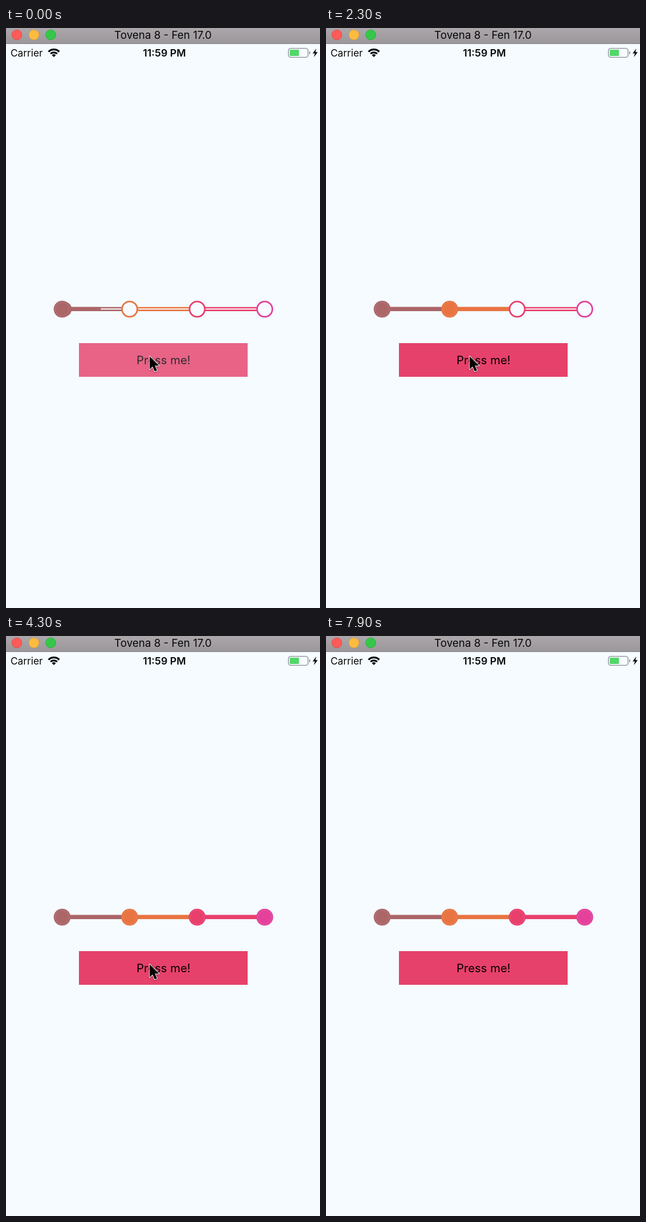
Animation, 551 px wide and 1016 px high, one loop 8000 ms. Source, as an HTML page:

```html
<!DOCTYPE html>
<html lang="en">
<head>
<meta charset="utf-8">
<title>Step progress</title>
<style>
  html, body { margin: 0; width: 100%; height: 100%; overflow: hidden; background: #f5fbff; }
  svg { display: block; width: 100%; height: 100%; }
  text { font-family: Inter, "Liberation Sans", sans-serif; fill: #080808; }
  .mid { text-anchor: middle; }
</style>
</head>
<body>
<svg viewBox="0 0 551 1016">
  <defs>
    <linearGradient id="bar" x2="0" y2="1">
      <stop stop-color="#aca7ab"/>
      <stop offset="1" stop-color="#9b969a"/>
    </linearGradient>
    <clipPath id="dotClip"><path d="M0-14A14 14 0 0 0 0 14H30V-14Z"/></clipPath>
  </defs>
  <rect width="551" height="1016" fill="#f5fbff"/>

  <rect width="551" height="28" fill="url(#bar)"/>
  <rect y="27" width="551" height="1" fill="#858085"/>
  <g stroke-width=".8">
    <circle cx="19" cy="12" r="8.8" fill="#fc5b57" stroke="#df4744"/>
    <circle cx="49" cy="12" r="8.8" fill="#fdbc40" stroke="#dea034"/>
    <circle cx="78.5" cy="12" r="8.8" fill="#34c84a" stroke="#27aa35"/>
  </g>
  <text class="mid" x="275.5" y="19" font-size="18.8">Tovena 8 - Fen 17.0</text>

  <text x="8" y="49.5" font-size="17.3">Carrier</text>
  <g fill="none" stroke="#080808" stroke-width="3.2">
    <path d="M74.6 41.6A13.2 13.2 0 0 1 93.4 41.6"/>
    <path d="M78.2 45.2A8.2 8.2 0 0 1 89.8 45.2"/>
  </g>
  <path d="M84 51L80.6 47.5A4.8 4.8 0 0 1 87.4 47.5Z" fill="#080808"/>
  <text class="mid" x="278" y="49.5" font-size="17.8" font-weight="600">11:59 PM</text>
  <rect x="495.6" y="35.6" width="34.4" height="15.8" rx="4" fill="none" stroke="#8b9094" stroke-width="1.4"/>
  <rect x="498" y="38" width="16" height="11" rx="1" fill="#53d769"/>
  <path d="M532 40.5Q534 41.5 534 43.5T532 46.5Z" fill="#8b9094"/>
  <path d="M544.5 36L538 44.4H542L540.3 51L547 42.2H543Z" fill="#080808"/>

  <g id="track" transform="translate(98.5 492.5)"></g>

  <g id="button">
    <rect x="128" y="552" width="296" height="59" fill="#e6416b"/>
    <text class="mid" x="276.3" y="588.8" font-size="20.3" style="fill:#000">Press me!</text>
  </g>
  <circle id="ring" cx="251.8" cy="577.8" r="32" fill="none" stroke="#000" stroke-width="2.1"/>
  <g id="cursor" stroke-linejoin="round">
    <path id="arrow" d="M252 575V598L257.2 593L261 601.6L265 599.8L261.3 591.6H268.5Z"
      fill="#000" stroke="#fff" stroke-width="1.8" paint-order="stroke"
      style="filter:drop-shadow(0 1px 1.5px rgba(0,0,0,.35))"/>
  </g>
</svg>
<script>
const LOOP = 8000, TICK = 100, STEP = 118.5;
const COLORS = ['#ab6668', '#e87441', '#e83f6d', '#e3419b'];

// Touches: ring appears at touch, dot fills at press, line fills at release.
const PRESSES = [
  { touch: -240, press: -165, release: -165 },
  { touch: 1300, press: 1300, release: 1750 },
  { touch: 2750, press: 2750, release: 3235 },
  { touch: 3280, press: 3364, release: 3364 }
];
const LEAVE = 4400;

const $ = id => document.getElementById(id);
const track = $('track'), button = $('button'), ring = $('ring'), cursor = $('cursor');

function add(parent, tag, attrs) {
  const node = document.createElementNS('http://www.w3.org/2000/svg', tag);
  for (const key in attrs) node.setAttribute(key, attrs[key]);
  return parent.appendChild(node);
}

const steps = COLORS.map((color, i) => {
  const g = add(track, 'g', { transform: `translate(${i * STEP} 0)` });
  let line = null;
  if (i < COLORS.length - 1) {
    add(g, 'path', { d: 'M14-2.4H104.5M14 2H104.5', stroke: color, 'stroke-width': 2.8 });
    add(g, 'path', { d: 'M14-.2H104.5', stroke: '#fff', 'stroke-width': 1.7 });
    line = add(g, 'rect', { x: 14, y: -3.8, height: 7.2, fill: color });
  }
  add(g, 'circle', { r: 13.4, fill: 'none', stroke: color, 'stroke-width': 2.8 });
  const fill = add(g, 'rect', { x: -13, y: -13, height: 26, fill: color, 'clip-path': 'url(#dotClip)' });
  const seam = add(g, 'circle', { r: 12.2, fill: 'none', stroke: '#fff', 'stroke-width': .7, 'stroke-opacity': .2 });
  return { line, fill, seam };
});

const easeInOut = p => p < .5 ? 2 * p * p : 1 - 2 * (1 - p) * (1 - p);
const clamp = p => Math.min(1, Math.max(0, p));
const ramp = (ms, length) => easeInOut(clamp(ms / length));

function spring(ms) {
  if (ms <= 0) return 0;
  const t = ms / 1000, omega = 23, zeta = .52;
  const root = Math.sqrt(1 - zeta * zeta), angle = omega * root * t;
  return 1 - Math.exp(-zeta * omega * t) * (Math.cos(angle) + zeta / root * Math.sin(angle));
}

function draw(t) {
  let opacity = 1, touching = false;
  PRESSES.forEach(({ touch, press, release }, i) => {
    const { line, fill, seam } = steps[i];
    const width = 26 * spring(t - press);
    fill.setAttribute('width', width);
    fill.setAttribute('rx', Math.min(13, width / 2));
    fill.setAttribute('ry', Math.min(13, width / 2));
    seam.setAttribute('visibility', t - press > 120 ? 'visible' : 'hidden');
    if (line) line.setAttribute('width', 90.5 * ramp(t - release, 300));
    if (t >= press) opacity = .2 + .8 * ramp(t - release, 250);
    if (t >= touch && t < release) touching = true;
  });
  button.setAttribute('opacity', opacity);
  ring.setAttribute('visibility', touching ? 'visible' : 'hidden');

  const away = Math.max(0, t - LEAVE) / 100;
  cursor.setAttribute('transform', `translate(0 ${46 * away ** 1.87})`);
  cursor.setAttribute('visibility', away < 4 ? 'visible' : 'hidden');
}

const start = performance.now();
function frame() {
  const t = (performance.now() - start) % LOOP;
  draw(Math.floor(t / TICK) * TICK);
  requestAnimationFrame(frame);
}
frame();
</script>
</body>
</html>
```
